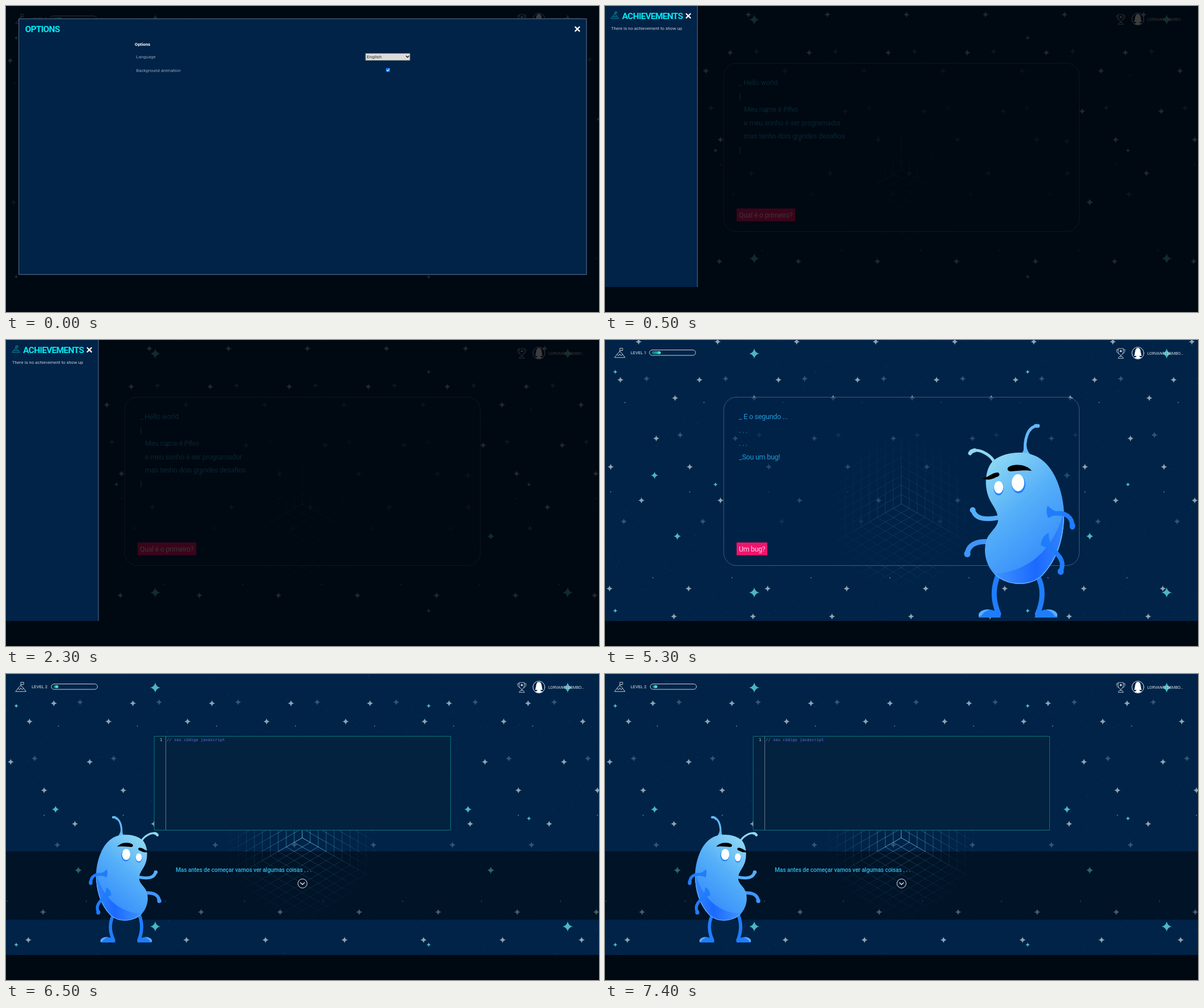
An HTML page with a canvas that plays this animation: 1041 by 538 pixels, repeating every 8 s.

```html
<!DOCTYPE html>
<html lang="en">
<head>
<meta charset="utf-8">
<title>Space bug</title>
<style>
html, body { margin: 0; height: 100%; overflow: hidden; background: #000811; }
canvas { display: block; }
</style>
</head>
<body>
<canvas id="stage" width="1041" height="538"></canvas>
<script>
const ctx = document.getElementById('stage').getContext('2d');
const NAVY = '#002347', CYAN = '#05e8f0', SKY = '#1f9ad6';
const FLOOR = 494;

function text(str, x, y, size, color, weight = 400, spacing = 0, font = 'Roboto, sans-serif') {
  ctx.font = `${weight} ${size}px ${font}`;
  ctx.letterSpacing = spacing + 'px';
  ctx.fillStyle = color;
  ctx.fillText(str, x, y);
}

function fill(d, color) {
  ctx.fillStyle = color;
  ctx.fill(new Path2D(d));
}

function stroke(d, color, width = 1, cap = 'round') {
  ctx.strokeStyle = color;
  ctx.lineWidth = width;
  ctx.lineCap = cap;
  ctx.lineJoin = 'round';
  ctx.stroke(new Path2D(d));
}

function box(x, y, w, h, r, color, border, width = 1) {
  ctx.beginPath();
  ctx.roundRect(x, y, w, h, r);
  if (color) { ctx.fillStyle = color; ctx.fill(); }
  if (border) { ctx.strokeStyle = border; ctx.lineWidth = width; ctx.stroke(); }
}

function oval(x, y, rx, ry, color, border) {
  ctx.beginPath();
  ctx.ellipse(x, y, rx, ry, 0, 0, 7);
  if (color) { ctx.fillStyle = color; ctx.fill(); }
  if (border) { ctx.strokeStyle = border; ctx.lineWidth = 1; ctx.stroke(); }
}

function sparkle(x, y, r, color) {
  const s = r * 0.16;
  fill(`M${x} ${y - r}Q${x + s} ${y - s} ${x + r} ${y}Q${x + s} ${y + s} ${x} ${y + r}` +
       `Q${x - s} ${y + s} ${x - r} ${y}Q${x - s} ${y - s} ${x} ${y - r}`, color);
}

// Drifting layer repeats every TILE px; the teal layer stays put.
const TILE = 138.75;
const BRIGHT = [[59, 3], [27, 70], [123, 102], [90, 173], [10, 223], [64, 282], [8, 437], [121, 486]];
const DIM = [[73, 68], [132, 167], [33, 319]];
const SPECKS = [[35, 110], [10, 267], [84, 418]];
const TEAL = [[262, 24, 9], [87, 238, 6.5], [194, 254, 4], [127, 345, 6.5], [18, 56, 4], [262, 444, 9], [18, 476, 4]];

function tiled(points, dx, dy, draw) {
  for (const [px, py] of points)
    for (let x = (px + dx) % TILE - TILE; x < 1050; x += TILE) draw(x, py + dy);
}

function sky([dx, dy]) {
  ctx.fillStyle = NAVY;
  ctx.fillRect(0, 0, 1041, FLOOR);
  let seed = 7;
  const random = () => (seed = seed * 16807 % 2147483647) / 2147483647;
  for (let i = 0; i < 1500; i++) {
    ctx.fillStyle = `rgba(120,180,210,${0.06 + 0.24 * random() ** 2})`;
    ctx.fillRect(random() * 1041, random() * FLOOR, 1, 1);
  }
  tiled(BRIGHT, dx, dy, (x, y) => sparkle(x, y, 5.5, 'rgba(190,208,218,.75)'));
  tiled(DIM, dx, dy, (x, y) => sparkle(x, y, 5.5, 'rgba(150,180,200,.35)'));
  tiled(SPECKS, dx, dy, (x, y) => oval(x, y, 0.9, 0.9, 'rgba(190,208,218,.6)'));
  for (const [x, y, r] of TEAL) {
    sparkle(x, y, r, '#4db6bf');
    sparkle(x + 724, y, r, '#4db6bf');
  }
}

function cubeGrid() {
  const glow = ctx.createRadialGradient(520, 300, 5, 520, 300, 138);
  glow.addColorStop(0, 'rgba(95,190,220,.75)');
  glow.addColorStop(0.45, 'rgba(80,170,205,.4)');
  glow.addColorStop(1, 'rgba(80,170,205,0)');
  let d = '';
  for (let k = 0; k < 11; k++) {
    const y = 288 + 8 * k, top = 288 - 16.5 * k;
    for (const side of [-1, 1]) {
      const x = 520 + side * 14 * k;
      d += `M${x} 150V${y}L${x - side * 168} ${y + 96}`;
      d += `M520 ${top}L${520 + side * 140} ${top + 80}`;
    }
  }
  stroke(d, glow, 0.8);
}

function mountain(x, y, scale, color) {
  ctx.save();
  ctx.translate(x, y);
  ctx.scale(scale, scale);
  stroke('M-9 7L-2 -2Q0 -4 2 -2L9 7ZM-5 2L-2 4L0 1L2 4L5 2M0 -3V-9H5V-5H0', color, 1);
  ctx.restore();
}

function hud(level) {
  const x = level === 1 ? 78 : 79.5, end = level === 1 ? 98 : 92;
  mountain(26, 23.5, 1, '#c3ccd6');
  text('LEVEL ' + level, 45, 25.3, 7.6, '#e4eaf0');
  box(x, 17.5, 81, 9.5, 4.75, null, '#c8d2dc');
  const bar = ctx.createLinearGradient(x + 4, 0, end, 0);
  bar.addColorStop(0, '#08716f');
  bar.addColorStop(1, '#1cd6c2');
  box(x + 4, 19.8, end - x - 4, 5, 2.5, bar);
  oval(end - 3, 22.3, 2.5, 2.5, '#3fe0cf');

  stroke('M901 15H910V21Q909 26 905.5 27Q902 26 901 21ZM901 17H898Q898 23 902 24M910 17H913Q913 23 909 24' +
         'M905.5 27V29M901 32L903 29H908L910 32Z', '#c3ccd6', 0.9);
  sparkle(905.5, 19.5, 2.6, '#fff');
  oval(935.5, 23, 10.5, 10.5, null, '#dfe6ec');
  fill('M935.5 14C930 14 931 22 929 28L933 28Q932 31 928 31Q935.5 35 943 31Q939 31 938 28L942 28C940 22 941 14 935.5 14Z', '#fff');
  text('LORVANTI DEMBO...', 952, 25.5, 7.2, '#d5dde5', 400, -0.1);
}

function cross(x, y) {
  stroke(`M${x - 3.6} ${y - 3.6}l7.2 7.2m0 -7.2l-7.2 7.2`, '#fff', 2.2);
}

function card(lines, button, width) {
  box(208.5, 100.5, 624, 296, 22, 'rgba(0,35,71,.7)', 'rgba(120,145,185,.5)');
  for (const [str, x, y] of lines) text(str, x, y, 12.5, SKY, 400, -0.25);
  ctx.fillStyle = '#f0146e';
  ctx.fillRect(231, 356, width, 22.5);
  text(button, 235, 371.5, 12.2, '#fbd5e4', 400, -0.2);
}

function shade() {
  ctx.fillStyle = 'rgba(0,0,0,.76)';
  ctx.fillRect(0, 0, 1041, FLOOR);
}

function bug() {
  const BLUE = '#1f7dfc', MID = '#479ffb';
  stroke('M689 416C680 440 682 460 691 482M759 414C771 435 769 460 759 482', BLUE, 9);
  fill('M656 488V482C660 470 690 470 695 488ZM794 488V482C790 470 760 470 754 488Z', BLUE);
  fill('M656 486V482C659 475 668 473 676 474C666 477 662 482 660 486ZM794 486V482C791 475 782 473 774 474C784 477 788 482 790 486Z', '#58aefd');

  stroke('M683 215C680 205 662 193 650 194Q643 195 641 199', '#8ed8f4', 5);
  stroke('M738 202C735 175 742 152 759 151', '#62b9fa', 5);
  stroke('M649 194Q643 195 641 199', '#8ed8f4', 7);
  stroke('M756 151L760 151', '#62b9fa', 6.5);
  fill('M729 202Q736 196 736 186L740 186Q741 197 749 203Z', '#62b9fa');

  stroke('M692 312C672 316 650 316 646 299', '#56aefa', 8);
  stroke('M676 355C655 353 638 358 636 376', '#3f95fb', 9);
  oval(645.5, 299, 5, 5, '#56aefa');
  oval(636, 376, 5.7, 6, '#3f95fb');

  const shape = 'M683 211C700 198 735 192 760 206C795 226 806 280 806 310C805 350 795 385 768 414' +
    'C745 436 705 432 685 413C668 396 664 372 669 354C673 338 690 330 690 316C690 296 674 288 670 264C666 240 672 220 683 211Z';
  const skin = ctx.createLinearGradient(675, 220, 800, 370);
  skin.addColorStop(0, '#8ad6f4');
  skin.addColorStop(0.45, '#56b0f8');
  skin.addColorStop(1, '#358cfc');
  fill(shape, skin);
  ctx.save();
  ctx.clip(new Path2D(shape));
  const belly = ctx.createLinearGradient(690, 0, 800, 0);
  belly.addColorStop(0, '#3c90fc');
  belly.addColorStop(0.6, '#1c69ff');
  belly.addColorStop(1, '#2f82fd');
  fill('M674 411C740 412 790 370 807 295V440H680Z', belly);
  stroke('M806 310C805 350 795 385 768 414C745 436 705 432 685 413', '#5eb2fc', 3);
  ctx.restore();

  fill('M777 291C784 298 788 301 798 302V308C788 308 784 310 778 313Q773 302 777 291Z', BLUE);
  stroke('M792 305C808 303 820 311 820 326', BLUE, 8);
  oval(820.5, 327, 5, 6.5, BLUE);
  fill('M779 339Q766 345 765 361Q775 364 785 373L790 369Q778 355 779 339Z', BLUE);
  stroke('M783 367C797 377 808 390 800 406', BLUE, 8);
  oval(800, 407, 5.5, 6, BLUE);

  oval(691, 261, 8.5, 12, '#2383fb');
  oval(726, 253.5, 12, 16, '#2383fb');
  oval(691, 259, 8, 11, '#fff');
  oval(725, 251, 11, 15, '#fff');
  fill('M661 243C672 243 680 232 690 233C694 235 693 240 687 241C678 246 670 247 661 243Z', '#000');
  fill('M707 225C712 218 738 216 749 230C738 228 722 230 712 231Q705 230 707 225Z', '#000');
}

function optionsScene() {
  hud(1);
  shade();
  box(22.5, 22.5, 996.5, 449.5, 0, NAVY, '#3b5a78', 1.5);
  text('OPTIONS', 33.5, 46, 15.5, CYAN, 700, -0.75);
  cross(1003, 40.5);
  text('Options', 226, 69.7, 7.8, '#fff', 700);
  text('Language', 228.5, 91.5, 7.8, '#92a2b4');
  text('Background animation', 228.5, 116, 7.8, '#92a2b4');
  box(631.5, 83.5, 77.5, 12, 0, '#dcdcdc', '#8d8d8d');
  text('English', 633.5, 92.2, 8, '#333');
  stroke('M702.5 88l2.3 2.3l2.3 -2.3', '#111', 1.3);
  box(667, 109, 7, 7, 1, '#0b76f8');
  stroke('M668.7 112.6l1.4 1.5l2.4 -3', '#fff', 1.1);
}

function achievementsScene() {
  cubeGrid();
  hud(1);
  card([['_ Hello world', 235, 139], ['{', 235, 163], ['Meu name é Pilvo', 244, 186],
    ['e meu sonho é ser programador', 244, 209.5], ['mas tenho dois grandes desafios', 244, 233],
    ['}', 235, 257]], 'Qual é o primeiro?', 103);
  shade();
  ctx.fillStyle = NAVY;
  ctx.fillRect(0, 0, 162, FLOOR);
  ctx.fillStyle = '#34536f';
  ctx.fillRect(161.5, 0, 1.5, FLOOR);
  mountain(17.3, 16.5, 0.72, '#12b4c4');
  text('ACHIEVEMENTS', 30, 23, 15.5, CYAN, 700, -0.75);
  cross(146.3, 17.3);
  text('There is no achievement to show up', 10.8, 42.3, 7.8, '#c3ccd6');
}

function bugScene() {
  cubeGrid();
  hud(1);
  card([['_ E o segundo ...', 235, 139], ['. . .', 235, 162.5], ['. . .', 235, 186],
    ['_Sou um bug!', 235, 209.5]], 'Um bug?', 54);
  bug();
}

function editorScene() {
  const mono = '"DejaVu Sans Mono", monospace';
  cubeGrid();
  hud(2);
  ctx.fillStyle = 'rgba(0,0,0,.45)';
  ctx.fillRect(0, 312, 1041, 120);
  box(260.5, 109.5, 520, 165, 0, '#03223f', '#0b7480');
  stroke('M280.5 110V274', '#60758a', 1, 'butt');
  text('1', 270, 118, 7.06, '#c8d0d8', 400, 0, mono);
  text('// seu código javascript', 282.3, 118, 7.06, '#5f6fe0', 400, 0, mono);
  text('Mas antes de começar vamos ver algumas coisas . . .', 298, 348, 10.2, '#2cb9ea', 500, -0.1);
  oval(520.5, 368.3, 8, 8, null, '#e6ecf0');
  stroke('M517 367l3.5 3.2l3.5 -3.2', '#e6ecf0', 1.3);
  ctx.save();
  ctx.translate(684.4, 153.3);
  ctx.scale(-0.653, 0.653);
  bug();
  ctx.restore();
}

const scenes = [
  { until: 500, drift: [119, 26], draw: optionsScene },
  { until: 3500, drift: [54, 12], draw: achievementsScene },
  { until: 6500, drift: [0, 0], draw: bugScene },
  { until: 8000, drift: [57, -18.5], draw: editorScene }
];
let current;

function render() {
  const time = performance.now() % 8000;
  const scene = scenes.find(s => time < s.until);
  if (scene !== current) {
    current = scene;
    sky(scene.drift);
    scene.draw();
    ctx.fillStyle = '#000811';
    ctx.fillRect(0, FLOOR, 1041, 44);
  }
  requestAnimationFrame(render);
}
render();
</script>
</body>
</html>
```
